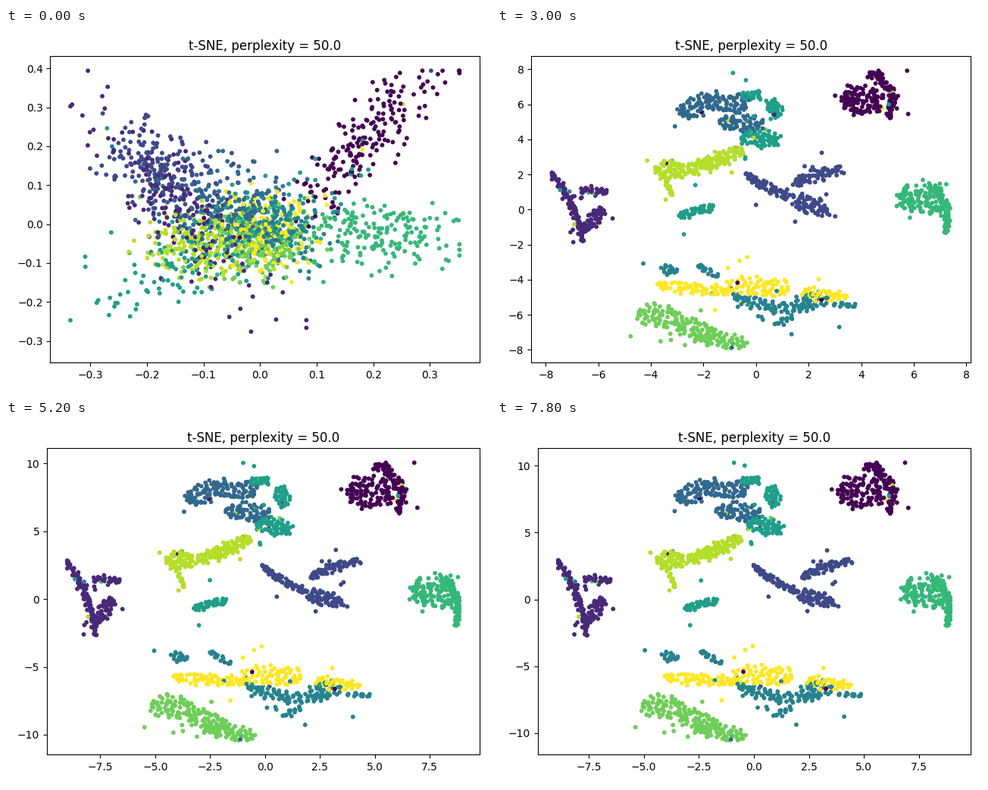
A matplotlib script that plays this animation: 640x480 px, repeating every 8 s.

```python
import numpy as np
import matplotlib.pyplot as plt
from matplotlib.animation import FuncAnimation

FRAMES, INTERVAL = 40, 200
PER_DIGIT = 190
TOP, BOTTOM = 37.5, 441
rng = np.random.default_rng(50)

# Axis limits at a few moments: seconds, left, right, low, high
LIMITS = np.array([
    [0.0, -0.371, 0.388, -0.356, 0.4311],
    [1.0, -1.104, 1.018, -1.303, 1.494],
    [2.2, -5.03, 4.42, -4.79, 5.15],
    [3.0, -8.55, 8.16, -8.73, 8.74],
    [4.2, -9.96, 9.69, -11.0, 10.66],
    [4.8, -9.95, 9.76, -11.45, 11.1],
    [7.8, -9.80, 9.84, -11.62, 11.31],
])
SIGN = np.array([-1, 1, -1, 1])

starts, earlies, finals, digits = [], [], [], []


def to_axes(xy, left, right):
    """Stage pixels to fractions of the axes."""
    x, y = xy
    frac = np.column_stack([(x - left) / (right - left),
                            (BOTTOM - y) / (BOTTOM - TOP)])
    return np.clip(frac, 0.047, 0.953)


def cloud(n, cx, cy, sx, sy, rho=0.0):
    a, b = np.clip(rng.normal(size=(2, n)), -2.6, 2.6)
    return np.array([cx + sx * a,
                     cy + sy * (rho * a + np.sqrt(1 - rho * rho) * b)])


def band(u, v, x0, y0, x1, y1, w, bend=0):
    """Points in a tapered, bent band; u runs along it, v across it."""
    dx, dy = x1 - x0, y1 - y0
    off = bend * 4 * u * (1 - u) + w * v * np.sqrt(1 - 0.85 * (2 * u - 1) ** 2)
    off = off / np.hypot(dx, dy)
    return np.array([x0 + dx * u - dy * off, y0 + dy * u + dx * off])


def add_digit(digit, start, early, *parts):
    """A cloud stretches into one band, which then splits into its parts."""
    weights = [np.hypot(p[2] - p[0], p[3] - p[1]) * p[4] ** 0.5 for p in parts]
    ends = np.cumsum([0] + weights) / sum(weights)
    for part, lo, hi in zip(parts, ends[:-1], ends[1:]):
        n = round(PER_DIGIT * (hi - lo))
        i = np.arange(n)
        u = (rng.random() + i * 0.7548777) % 1
        v = 2 * ((rng.random() + i * 0.5698403) % 1) - 1
        stray = rng.random(n) < 0.06
        jitter = rng.normal(size=(2, n))
        loose = np.where(stray, 2.2, 0.25) * early[4] + 1
        spread = np.where(stray, 17, 1 + 0.06 * part[4])
        starts.append(to_axes(cloud(n, *start), 58, 625))
        earlies.append(to_axes(
            band(lo + (hi - lo) * u, v, *early) + loose * jitter, 58, 614.5))
        finals.append(to_axes(band(u, v, *part) + spread * jitter, 54, 625))
        mixed = rng.random(n) < 0.02
        digits.append(np.where(mixed, rng.integers(0, 10, n), digit))


add_digit(0, (480, 145, 48, 48, -0.82), (548, 58, 478, 115, 6),
          (484, 61, 506, 62, 5), (500, 66, 516, 124, 6, -13),
          (450, 95, 513, 95, 21))
add_digit(1, (235, 245, 62, 66, 0.84), (85, 243, 206, 260, 5),
          (79, 184, 118, 284, 4, -7), (112, 209, 150, 212, 4),
          (118, 268, 140, 235, 8))
add_digit(2, (205, 187, 38, 30, 0.4), (285, 205, 395, 255, 26, -45),
          (338, 192, 396, 226, 4, 3), (403, 209, 469, 186, 5, -4),
          (396, 230, 446, 240, 9))
add_digit(3, (290, 235, 46, 28), (325, 184, 415, 165, 15, -12),
          (238, 105, 290, 86, 13), (292, 93, 330, 93, 12),
          (288, 118, 345, 124, 12))
add_digit(4, (352, 265, 33, 25), (270, 381, 436, 392, 8, 5),
          (217, 309, 238, 315, 6), (267, 304, 300, 322, 3),
          (314, 349, 426, 362, 8, 9), (408, 352, 442, 352, 10),
          (448, 362, 484, 363, 2), (366, 390, 392, 378, 4))
add_digit(5, (270, 290, 80, 42, -0.75), (228, 238, 440, 140, 15, 10),
          (248, 248, 291, 238, 5), (331, 136, 376, 145, 11),
          (321, 80, 347, 80, 5), (364, 88, 366, 114, 9))
add_digit(6, (492, 275, 54, 23), (485, 215, 572, 256, 8, -28),
          (535, 226, 594, 230, 19), (575, 205, 594, 273, 6, -9))
add_digit(7, (325, 287, 38, 21), (203, 376, 380, 406, 11, 22),
          (191, 376, 246, 380, 15), (238, 388, 290, 402, 13),
          (262, 408, 325, 415, 10))
add_digit(8, (262, 285, 42, 22), (245, 210, 385, 205, 18),
          (228, 203, 236, 222, 2), (212, 186, 246, 184, 13),
          (252, 183, 322, 154, 8, 3))
add_digit(9, (345, 270, 33, 25), (195, 335, 432, 392, 8, 18),
          (223, 339, 314, 345, 7), (312, 338, 388, 338, 13),
          (408, 344, 468, 351, 7))

labels = np.concatenate(digits)
order = rng.permutation(len(labels))
labels = labels[order]
start, early, final = (np.vstack(p)[order] for p in (starts, earlies, finals))


def positions(t):
    """Stretch for one second, then settle exponentially."""
    if t < 1:
        return start + (early - start) * t
    return final + (early - final) * np.exp((1 - t) / 0.87)


def limits(t):
    logs = np.log(np.abs(LIMITS[:, 1:])).T
    return SIGN * np.exp([np.interp(t, LIMITS[:, 0], c) for c in logs])


fig, ax = plt.subplots(figsize=(6.4, 4.8), dpi=100)
dots = ax.scatter(*start.T, c=labels, s=10, cmap="viridis", vmin=0, vmax=9)
ax.set_title("t-SNE, perplexity = 50.0")


def draw(i):
    t = i * INTERVAL / 1000
    left, right, low, high = limits(t)
    corner, size = (left, low), (right - left, high - low)
    dots.set_offsets(corner + positions(t) * size)
    ax.set_xlim(left, right)
    ax.set_ylim(low, high)
    fig.subplots_adjust(left=0.125, right=0.9, bottom=0.11, top=0.88)
    fig.tight_layout()
    return dots,


anim = FuncAnimation(fig, draw, frames=FRAMES, interval=INTERVAL,
                     init_func=lambda: draw(0), repeat=True, repeat_delay=0)
plt.show()
```
